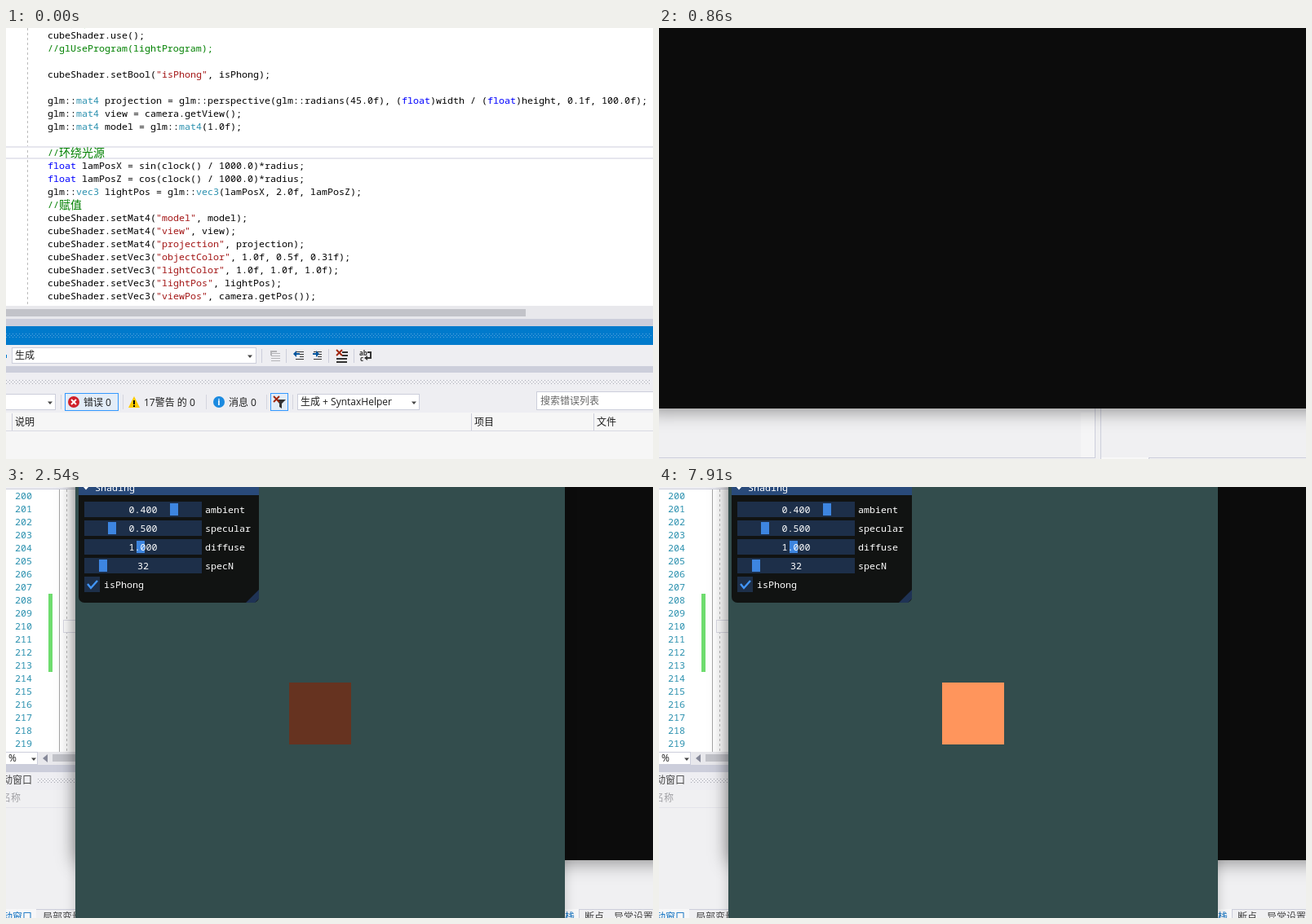
Write an HTML page with a canvas that moves like this. It is 793x529 px and loops after 8000 ms.

```html
<!DOCTYPE html>
<html lang="zh">
<head>
<meta charset="utf-8">
<title>Shading demo</title>
<style>
html, body { margin: 0; width: 100%; height: 100%; overflow: hidden; background: #fff; }
canvas { display: block; }
</style>
</head>
<body>
<canvas id="stage" width="793" height="529"></canvas>
<script>
const W = 793, H = 529, LOOP = 8000, STEP = 70;
const stage = document.getElementById('stage').getContext('2d');
const layer = document.createElement('canvas');
layer.width = 600;
layer.height = 631;
const glLayer = layer.getContext('2d');
let c = stage;

const CJK = '"Noto Sans CJK SC", "Noto Sans CJK", sans-serif';
const UI = '12px "Open Sans", ' + CJK;
const MONO = '11.667px "Noto Sans Mono", "Liberation Mono", monospace';

const CODE = `//创建程序
cubeShader.use();
//glUseProgram(lightProgram);

cubeShader.setBool("isPhong", isPhong);

glm::mat4 projection = glm::perspective(glm::radians(45.0f), (float)width / (float)height, 0.1f, 100.0f);
glm::mat4 view = camera.getView();
glm::mat4 model = glm::mat4(1.0f);

//环绕光源
float lamPosX = sin(clock() / 1000.0)*radius;
float lamPosZ = cos(clock() / 1000.0)*radius;
glm::vec3 lightPos = glm::vec3(lamPosX, 2.0f, lamPosZ);
//赋值
cubeShader.setMat4("model", model);
cubeShader.setMat4("view", view);
cubeShader.setMat4("projection", projection);
cubeShader.setVec3("objectColor", 1.0f, 0.5f, 0.31f);
cubeShader.setVec3("lightColor", 1.0f, 1.0f, 1.0f);
cubeShader.setVec3("lightPos", lightPos);
cubeShader.setVec3("viewPos", camera.getPos());
cubeShader.setFloat("ambientStrength", ambientStrength);`.split('\n');

function rect(x, y, w, h, color) {
  c.fillStyle = color;
  c.fillRect(x, y, w, h);
}

function box(x, y, w, h, fill, border) {
  rect(x, y, w, h, border);
  rect(x + 1, y + 1, w - 2, h - 2, fill);
}

function text(s, x, y, color = '#1e1e1e', font = UI) {
  c.font = font;
  c.fillStyle = color;
  c.fillText(s, x, y + 4);
}

function line(points, color, width = 1) {
  c.strokeStyle = color;
  c.lineWidth = width;
  c.beginPath();
  points.forEach(([x, y]) => c.lineTo(x, y));
  c.stroke();
}

function poly(points, color) {
  c.fillStyle = color;
  c.beginPath();
  points.forEach(([x, y]) => c.lineTo(x, y));
  c.fill();
}

const arrow = (x, y, r = 3, color = '#444') => poly([[x - r, y - r / 2], [x + r, y - r / 2], [x, y + r / 2 + 0.5]], color);

function dots(x0, x1, y, color) {
  for (let row = 0; row < 3; row++)
    for (let x = x0 + (row % 2) * 2; x < x1; x += 4) rect(x, y + row * 2, 1, 1, color);
}

function dashes(x, y0, y1) {
  for (let y = y0; y < y1; y += 6) rect(x, y, 1, 3, '#bbb');
}

function codeLine(s, x, y) {
  const parts = s.match(/\/\/[\x00-\x7f]*|[^\x00-\x7f]+|"[^"]*"|\b(?:float|mat4|vec3)\b|\w+|\W/g) || [];
  for (const p of parts) {
    const wide = p.charCodeAt(0) > 127;
    const color = wide || p.startsWith('//') ? '#008000'
      : p[0] === '"' ? '#a31515'
      : p === 'float' ? '#0000ff'
      : p === 'mat4' || p === 'vec3' ? '#2b91af' : '#000';
    text(p, x, wide ? y + 1 : y, color, wide ? '300 14px ' + CJK : MONO);
    x += p.length * (wide ? 14 : 7);
  }
}

function clipped(x, y, w, h, draw) {
  c.save();
  c.beginPath();
  c.rect(x, y, w, h);
  c.clip();
  draw();
  c.restore();
}

function disc(x, y, color, mark) {
  c.fillStyle = color;
  c.beginPath();
  c.arc(x, y, 7, 0, 7);
  c.fill();
  if (mark) text(mark, x - 1.7, y, '#fff', 'bold 11px "Open Sans", sans-serif');
}

function listIcon(x, dir) {
  for (let i = 0; i < 4; i++) rect(x + (i === 1 || i === 2 ? 1 : -4), 397 + i * 3, i === 1 || i === 2 ? 5 : 10, 1, '#333');
  const blue = '#00539c';
  rect(x - 5, 399, 6, 2, blue);
  const tip = x - 2 + dir * 5;
  poly([[tip, 400], [tip - dir * 4, 396], [tip - dir * 4, 404]], blue);
}

function drawEditor() {
  rect(0, 0, W, H, '#fff');
  dashes(26, 0, 341);
  rect(0, 145, W, 2, '#e6e6ee');
  rect(0, 159, W, 2, '#e6e6ee');
  clipped(0, 0, W, 341, () => CODE.forEach((s, i) => codeLine(s, 51, i * 16 - 7)));
  rect(0, 341, W, 16, '#e8e8ec');
  rect(0, 345, 637, 9, '#c2c3c9');
  rect(0, 357, W, 9, '#cccedb');
  rect(0, 366, W, 23, '#007acc');
  dots(0, W - 2, 375, '#59a8de');

  rect(0, 389, W, 83, '#eeeef2');
  box(7, 392, 300, 20, '#fff', '#cccedb');
  text('生成', 11, 402);
  arrow(299, 403);
  rect(0, 401, 1, 4, '#007acc');
  [313, 343, 395, 426].forEach(x => rect(x, 394, 1, 17, '#cccedb'));
  for (let i = 0; i < 4; i++) rect(325, 399 + i * 3, 11, 1, '#b4b4b8');
  line([[332, 397], [325, 397], [325, 402]], '#b4b4b8', 2);
  listIcon(359, -1);
  listIcon(381, 1);
  for (let i = 0; i < 4; i++) rect(i < 2 ? 412 : 405, 397 + i * 4, i < 2 ? 7 : 13, 2, '#333');
  line([[405, 395], [412, 402]], '#a1260d', 2);
  line([[412, 395], [405, 402]], '#a1260d', 2);
  text('ab', 433, 398, '#333', 'bold 8px "Open Sans", sans-serif');
  text('c', 434, 405, '#333', 'bold 8px "Open Sans", sans-serif');
  line([[443, 398], [447, 398], [447, 405], [440, 405]], '#333', 2);
  poly([[439, 405], [443, 402], [443, 408]], '#333');

  rect(0, 415, W, 8, '#cccedb');
  dots(0, 789, 432, '#aaacb6');
  box(-2, 449, 63, 20, '#fff', '#cccedb');
  arrow(54, 460);
  [67, 143, 245, 319, 351].forEach(x => rect(x, 450, 1, 18, '#d4d5de'));
  box(72, 448, 66, 22, '#e3edf8', '#3399ff');
  disc(83, 459, '#d0202a');
  line([[80, 456], [86, 462]], '#fff', 2);
  line([[86, 456], [80, 462]], '#fff', 2);
  text('错误 0', 95, 460);
  poly([[157, 452], [164, 466], [150, 466]], '#fc0');
  rect(156, 457, 2, 5, '#000');
  rect(156, 463, 2, 2, '#000');
  text('17警告 的 0', 169, 460);
  disc(261, 459, '#1b8ae0', 'i');
  text('消息 0', 273, 460);
  box(324, 448, 22, 22, '#e3edf8', '#3399ff');
  poly([[331, 456], [343, 456], [338, 461], [338, 467], [335, 465], [335, 461]], '#333');
  line([[328, 452], [335, 459]], '#a1260d', 2);
  line([[335, 452], [328, 459]], '#a1260d', 2);
  box(357, 449, 150, 20, '#fff', '#cccedb');
  text('生成 + SyntaxHelper', 361, 459);
  arrow(500, 460);
  box(650, 446, 150, 23, '#fff', '#cccedb');
  text('搜索错误列表', 655, 458, '#666');

  rect(0, 472, W, 57, '#f6f6f6');
  rect(0, 494, W, 1, '#d9dae3');
  [[7, '说明'], [570, '项目'], [720, '文件']].forEach(([x, s]) => {
    rect(x, 473, 1, 21, '#cccedb');
    text(s, x + 4, 484);
  });
}

// Drawn in scene coordinates, which reach left of the stage before the pan.
function drawDebugger(full) {
  rect(-110, -10, 910, 560, '#fff');
  rect(-110, -10, 910, 21, '#eeeef2');
  rect(-110, 11, 910, 1, '#cccedb');
  [213, 551].forEach(x => {
    rect(x, -10, 5, 21, '#cccedb');
    arrow(x - 5, 1);
  });
  text('(全局范围)', 237, 0);
  c.strokeStyle = '#68217a';
  c.lineWidth = 1;
  c.strokeRect(561.5, -4.5, 6, 7);
  text('main()', 577, 0);

  rect(-37, 12, 1, 322, '#a5a5a5');
  dashes(-28, 12, 334);
  rect(-50, 140, 5, 96, '#6fdc6f');
  box(-32, 172, 840, 16, '#fff', '#dcdce6');
  clipped(-110, 12, 910, 322, () => {
    CODE.slice(0, 20).forEach((s, i) => {
      text(200 + i, -91, 20 + i * 16, '#2b91af', MONO);
      codeLine(s, 25, 20 + i * 16);
    });
  });
  rect(95, 173, 1, 14, '#000');

  rect(-110, 334, 910, 16, '#e8e8ec');
  box(-112, 334, 49, 16, '#fff', '#cccedb');
  text('%', -99, 342);
  arrow(-68, 343);
  poly([[-57, 342], [-51, 337], [-51, 347]], '#868999');
  rect(-45, 337, 766, 9, '#c2c3c9');
  rect(-110, 350, 910, 9, '#cccedb');
  rect(-110, 359, 910, 190, '#f0f0f2');
  if (!full) return;

  rect(-110, 359, 910, 22, '#eeeef2');
  text('自动窗口', -118, 369, '#444');
  dots(-63, 476, 367, '#a4a6b0');
  arrow(486, 370, 4, '#1e1e1e');
  rect(501, 365, 5, 6, '#1e1e1e');
  rect(499, 371, 9, 1, '#1e1e1e');
  rect(503, 372, 1, 4, '#1e1e1e');
  line([[517, 366], [525, 374]], '#1e1e1e', 1.6);
  line([[525, 366], [517, 374]], '#1e1e1e', 1.6);
  text('调用堆栈', 546, 369, '#444');
  dots(600, 800, 367, '#a4a6b0');
  [['名称', -108], ['值', 102], ['类型', 417], ['名称', 564]].forEach(([s, x]) => text(s, x, 391, '#a0a0a4'));
  rect(-110, 402, 645, 1, '#e4e4ea');
  rect(542, 402, 258, 1, '#e4e4ea');
  rect(517, 472, 17, 55, '#f5f5f6');
  rect(534, 359, 1, 168, '#cccedb');
  rect(541, 359, 1, 190, '#cccedb');

  rect(-110, 527, 645, 1, '#cccedb');
  rect(600, 527, 200, 1, '#cccedb');
  rect(-110, 527, 45, 22, '#f7f7f8');
  rect(542, 527, 58, 22, '#f7f7f8');
  text('自动窗口', -118, 537, '#0e70c0');
  text('局部变量', -57, 537, '#444');
  text('调用堆栈', 547, 537, '#0e70c0');
  text('断点', 607, 537, '#444');
  text('异常设置', 643, 537, '#444');
  rect(600, 527, 1, 22, '#cccedb');
}

function drawGlWindow(light) {
  c = glLayer;
  c.setTransform(1, 0, 0, 1, 0, 0);
  rect(0, 0, 600, 31, '#fff');
  rect(0, 31, 600, 600, '#334d4d');
  c.translate(-85, 53);
  rect(347, 240, 76, 76, `rgb(${[255, 127.5, 79].map(v => Math.min(255, Math.round(v * light)))})`);

  c.fillStyle = '#111312';
  c.beginPath();
  c.roundRect(89, -9, 221, 151, 7);
  c.fill();
  c.fillStyle = '#294a7a';
  c.beginPath();
  c.roundRect(89, -9, 221, 19, [7, 7, 0, 0]);
  c.fill();
  arrow(98, 1, 4, '#fff');
  text('Shading', 109, 1, '#fff', MONO);
  [['ambient', '0.400', 206], ['specular', '0.500', 130], ['diffuse', '1.000', 165], ['specN', '32', 119]]
    .forEach(([name, value, grab], i) => {
      const y = 28 + i * 23;
      rect(96, y - 10, 144, 19, '#1d2f49');
      rect(grab - 5, y - 8, 10, 15, '#3d85e0');
      text(value, 168 - value.length * 3.5, y, '#fff', MONO);
      text(name, 244, y, '#fff', MONO);
    });
  rect(96, 110, 19, 19, '#1d2f49');
  line([[100, 119], [104, 124], [112, 115]], '#4296fa', 2.4);
  text('isPhong', 120, 120, '#fff', MONO);
  poly([[310, 126], [310, 137], [305, 142], [294, 142]], '#1f3355');
  c = stage;
}

// The shadow is kept outside the window so that it does not darken a translucent one.
function shadow(x, y, w, h, strength, blur) {
  c.save();
  c.beginPath();
  c.rect(-400, -400, 1600, 1400);
  c.rect(x, y, w, h);
  c.clip('evenodd');
  c.shadowColor = `rgba(0,0,0,${strength})`;
  c.shadowBlur = blur;
  c.shadowOffsetY = 3;
  rect(x, y, w, h, '#000');
  c.restore();
}

// Opening of a window: fade and slight growth in 70 ms steps.
function opening(t, start, [x, y, w, h], strength, blur, draw) {
  if (t < start) return;
  const n = Math.min(4, Math.floor((t - start) / STEP));
  const scale = [0.92, 0.965, 0.99, 0.998, 1][n];
  const cx = x + w / 2, cy = y + h / 2;
  c.save();
  c.translate(cx, cy);
  c.scale(scale, scale);
  c.translate(-cx, -cy);
  c.globalAlpha = [0.15, 0.5, 0.79, 0.95, 1][n];
  shadow(x, y, w, h, strength, blur);
  draw(x, y, w, h);
  c.restore();
}

const LIGHT_TIMES = [5670, 5740, 5810, 5880, 6020, 6160, 6300, 6510, 6720, 6860, 6930, 7000, 7070, 7140,
  7350, 7420, 7490, 7560, 7700, 7910];

function lightAt(t) {
  if (t < 2100) return 1.168;
  if (t >= 2540) t = LIGHT_TIMES.filter(s => s <= t).pop() || 4000;
  const d = Math.max(0, Math.sin((t - 5585) / 1000));
  return 0.4 + 1.055 * d + 0.1 * d ** 32;
}

function draw(t) {
  c.setTransform(1, 0, 0, 1, 0, 0);
  if (t < 360) return drawEditor();
  const pan = t < 2100 ? 0 : Math.min(7, Math.floor((t - 2100) / 73.3) + 1) / 7;
  c.translate(Math.round(102 * pan), Math.round(-9 * pan));
  drawDebugger(t >= 430);
  opening(t, 580, [-17, -52, 993, 519], 0.42, 22, (...area) => rect(...area, '#0c0c0c'));
  if (t >= 1430) drawGlWindow(lightAt(t));
  opening(t, 1430, [-17, -44, 600, 631], 0.2, 14, (x, y) => c.drawImage(layer, x, y));
}

const begin = performance.now();
function tick() {
  draw((performance.now() - begin) % LOOP);
  requestAnimationFrame(tick);
}
tick();
</script>
</body>
</html>
```
